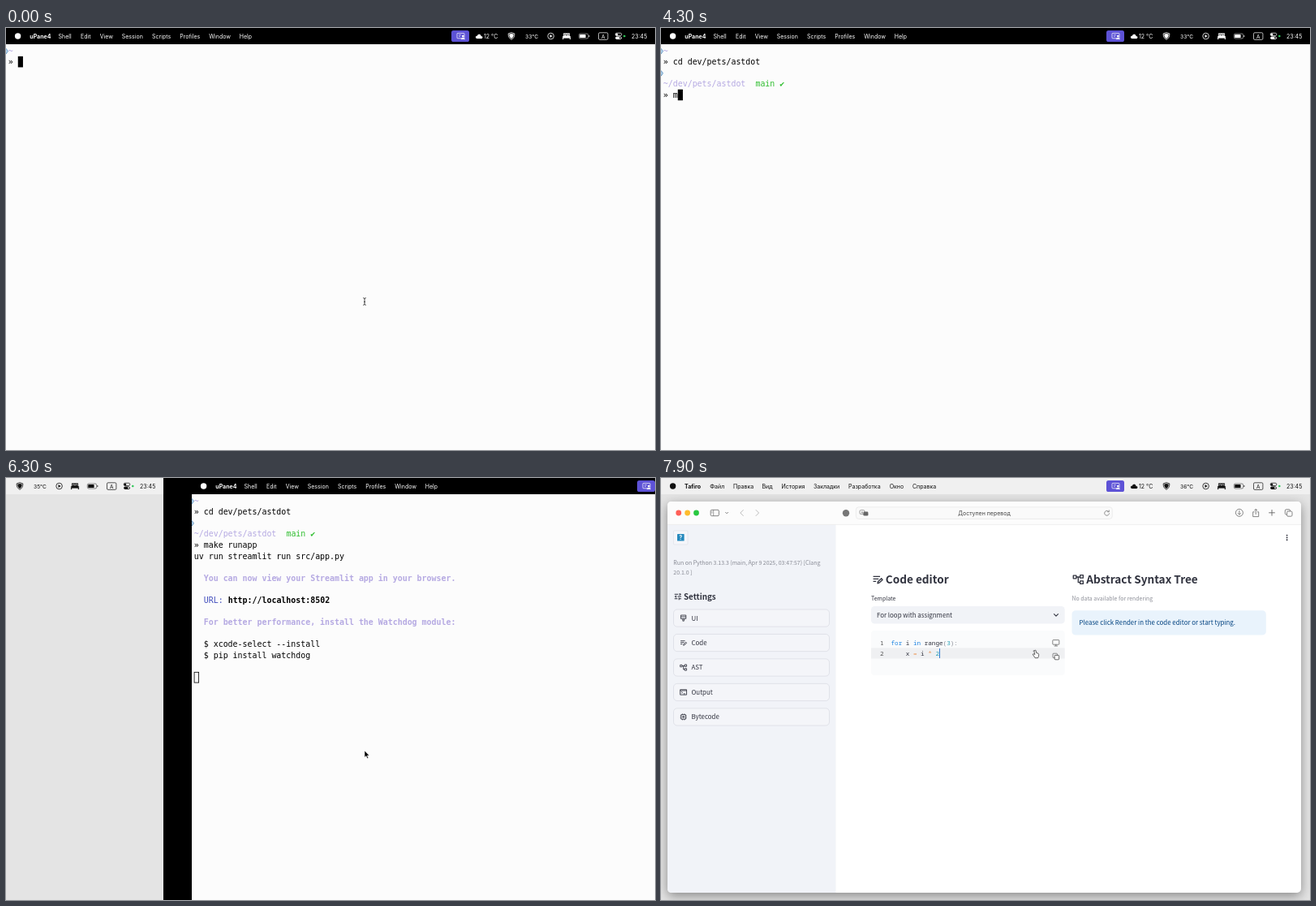
Recreate the animation shown at these times as an HTML page. Size 800 by 520 pixels, loop 8 s.

```html
<!DOCTYPE html>
<html lang="en">
<head>
<meta charset="utf-8">
<title>Terminal to browser</title>
<style>
html, body { margin: 0; width: 100%; height: 100%; overflow: hidden; background: #000; }
svg { display: block; width: 800px; height: 520px; }
text { white-space: pre; font-family: Inter, sans-serif; }
.mono { font-family: "DejaVu Sans Mono", monospace; }
.code { font-family: "Noto Sans Mono", monospace; }
.page { font-family: "Noto Sans CJK JP", "Noto Sans CJK SC", "Noto Sans CJK", "Open Sans", sans-serif; }
.b { font-weight: 700; }
.sb { font-weight: 600; }
.mid { text-anchor: middle; }
.win { filter: drop-shadow(0 4px 7px #0006); }
</style>
</head>
<body>
<svg id="stage" viewBox="0 0 800 520"></svg>
<script>
const stage = document.getElementById('stage');
const LOOP = 8000, STEP = 100, SPACE = 835;
const CELL = 5.98, ROW = 13.6, LEFT = 2.8;
const INK = '#31333f', LILAC = '#b5a9e2';

// drawing helpers
const text = (x, y, s, size, fill, cls = '') =>
  `<text x="${x}" y="${y}" font-size="${size}" fill="${fill}" class="${cls}">${s}</text>`;
const rect = (x, y, w, h, fill, r = 0, line = 'none', lw = .6) =>
  `<rect x="${x}" y="${y}" width="${w}" height="${h}" rx="${r}" fill="${fill}" stroke="${line}" stroke-width="${lw}"/>`;
const dot = (x, y, r, fill, line = 'none', lw = .8) =>
  `<circle cx="${x}" cy="${y}" r="${r}" fill="${fill}" stroke="${line}" stroke-width="${lw}"/>`;
const path = (d, line, lw = .8, fill = 'none') =>
  `<path d="${d}" stroke="${line}" stroke-width="${lw}" fill="${fill}" stroke-linejoin="round"/>`;
const move = (x, y, s, k = 1) => `<g transform="translate(${x} ${y}) scale(${k})">${s}</g>`;

const ICONS = {
  tune: 'M3 6h10M17 6h4M17 3v6M3 12h4M7 9v6M11 12h10M3 18h8M15 15v6M15 18h6',
  note: 'M3 6h14M3 11h11M3 16h6M12 20l1-4 7-6 2 3-7 6z',
  tree: 'M2 4h6v6H2zM16 3h6v6h-6zM16 15h6v6h-6zM8 7h8M12 7v11h4',
  term: 'M2 4h20v16H2zM2 7h20M6 10l3 3-3 3M12 17h6',
  chip: 'M5 5h14v14H5zM10 10h4v4h-4zM9 2v3M15 2v3M9 19v3M15 19v3M2 9h3M2 15h3M19 9h3M19 15h3',
  paint: 'M4 3h16v11H4zM4 8h16M10 14v7h4v-7'
};
const icon = (name, x, y, size) =>
  move(x - size / 2, y - size / 2, path(ICONS[name], INK, 2.2), size / 24);

// menu bar
const SHELL_MENU = [['uPane4', 29.3], ['Shell', 64.5], ['Edit', 92], ['View', 115.7], ['Session', 142.8],
  ['Scripts', 180], ['Profiles', 214.3], ['Window', 250.2], ['Help', 287.8]];
const WEB_MENU = [['Tafiro', 29], ['Файл', 60.3], ['Правка', 89], ['Вид', 124.5], ['История', 148.5],
  ['Закладки', 188], ['Разработка', 231], ['Окно', 281.7], ['Справка', 310]];

function menuBar(items, bg, fg, temp, weather) {
  return rect(0, 0, 800, 20, bg) + dot(14.6, 10, 3.7, fg) +
    items.map(([s, x], i) => text(x, 12.5, s, 7, fg, i ? '' : 'b')).join('') +
    rect(549, 3, 22, 14, '#5d52d6', 2.6) +
    rect(556, 6.4, 9, 6.4, 'none', .8, '#fff', .7) +
    path('M558 8.6h3M558 10.4h2', '#fff', .6) +
    dot(563.3, 10, 1.3, '#fff') + path('M560.8 13.8q2.5-4 5 0z', '#fff', .3, '#fff') +
    path('M580.6 13q-2-.3-1.6-2 .4-1.4 1.9-1.2 .6-2.3 2.7-2 1.8.4 1.9 2.2 2.2.1 1.9 1.8-.4 1.2-1.4 1.2z', weather, .2, weather) +
    text(589, 12.5, '12 °C', 7, weather) +
    path('M623 5.7l3.8 1.2q.4 5-3.8 7.4-4.2-2.4-3.8-7.4z', fg, .8) +
    path('M623 7l2.6.8q.2 3.4-2.6 5.1-2.8-1.7-2.6-5.1z', fg, .2, fg) +
    text(640, 12.5, temp, 6.7, fg) +
    dot(671.6, 10, 3.8, 'none', fg) + path('M670.6 8.2v3.6l2.9-1.8z', fg, .2, fg) +
    path('M686.2 14v-3.6l1-1V6.6h7.6v2.8l1 1V14h-.9v-1.4h-7.8V14z', fg, .2, fg) +
    path('M688.2 9.3V8h2.3v1.3M691.5 9.3V8h2.3v1.3', bg, .6) +
    rect(706.3, 7, 11.4, 6, 'none', 1.7, fg, .5) + rect(707.2, 7.9, 7.4, 4.2, fg, .9) +
    path('M718.8 9v2', fg, .8) +
    rect(730.5, 5.8, 11.4, 8.6, 'none', 1.4, fg, .7) + text(736.2, 12.5, 'A', 6.4, fg, 'mid') +
    rect(751.2, 6.2, 7.6, 3.3, 'none', 1.6, fg, .7) + dot(752.8, 7.9, 1.5, fg) +
    rect(751.2, 10.5, 7.6, 3.4, fg, 1.7) + dot(757, 12.2, 1, bg) +
    dot(762.3, 10, 1.3, '#30c95a') + text(771, 12.5, '23:45', 7, fg);
}

// terminal
const TYPED = [
  ['cd dev/pets/astdot', [[700, 1], [800, 2], [1000, 3], [1200, 5], [1400, 6], [1900, 7], [2200, 8],
    [2300, 9], [2500, 12], [2800, 13], [3100, 14], [3200, 15], [3300, 16], [3500, 18]]],
  ['make runapp', [[4300, 1], [4400, 3], [4500, 4], [4700, 5], [5100, 7], [5200, 8],
    [5600, 9], [5700, 10], [5800, 11]]]
];
const typedAt = (i, t) => TYPED[i][0].slice(0, TYPED[i][1].reduce((n, [at, k]) => t >= at ? k : n, 0));
const cell = (row, col, s, fill = '#000', cls = '') =>
  text(LEFT + col * CELL, 31.6 + row * ROW, s, 9.93, fill, 'mono ' + cls);
const caret = (row, col, hollow) => hollow
  ? rect(LEFT + .3, 21.7 + row * ROW, 5.5, 12.8, 'none', 0, '#000', .8)
  : rect(LEFT + col * CELL, 21.3 + row * ROW, CELL + .2, 13.5, '#000');
const mark = row => path(`M0 ${25.2 + row * ROW}l2.4 3.4-2.4 3.4`, '#4b86b8', .8, '#b7d6ee');

function terminal(t) {
  const first = typedAt(0, t), second = typedAt(1, t);
  let s = rect(0, 0, 800, 520, '#fcfcfc') +
    menuBar(SHELL_MENU, '#000', '#fff', '33°C', '#fff') +
    mark(0) + cell(0, 0, '~', LILAC) + cell(1, 0, '» ' + first);
  if (t < 3800) return s + caret(1, 2 + first.length);
  s += mark(2) + cell(3, 0, '~/dev/pets/astdot', LILAC) + cell(3, 19, 'main ✔', '#2dbd2d') +
    cell(4, 0, '» ' + second);
  if (t < 6000) return s + caret(4, 2 + second.length);
  s += cell(5, 0, 'uv run streamlit run src/app.py');
  if (t < 6100) return s + caret(6, 0);
  return s + cell(7, 2, 'You can now view your Streamlit app in your browser.', LILAC, 'b') +
    cell(9, 2, 'URL:', '#4450bd') + cell(9, 7, 'http://localhost:8502', '#000', 'b') +
    cell(11, 2, 'For better performance, install the Watchdog module:', LILAC, 'b') +
    cell(13, 2, '$ xcode-select --install') + cell(14, 2, '$ pip install watchdog') +
    caret(16, 0, t >= 6200);
}

// web page
const BUTTONS = [['UI', 'paint'], ['Code', 'note'], ['AST', 'tree'], ['Output', 'term'], ['Bytecode', 'chip']];

function sidebar(t) {
  let s = '<path d="M8 57.5h207.5V511H13q-5 0-5-5z" fill="#f1f3f8"/>';
  if (t < 6900) return s;
  s += rect(15.5, 65, 17.5, 17, '#f5f6fa', 1, '#dcdfe6');
  if (t >= 7500) s += rect(20, 69, 8.6, 8.6, '#2589bd', .6) + text(24.3, 76, '?', 7, '#fff', 'mid b');
  s += text(15.3, 106.5, 'Run on Python 3.13.3 (main, Apr 9 2025, 03:47:57) [Clang', 6.95, '#888a94', 'page') +
    text(15.3, 118.5, '20.1.0 ]', 6.95, '#888a94', 'page') +
    icon('tune', 20.8, 146, 11) + text(28, 149.8, 'Settings', 9.8, INK, 'page b');
  if (t < 7000) return s;
  return s + BUTTONS.map(([name, pic], i) => {
    const y = 162 + i * 30.45;
    return rect(15.5, y, 192, 21.2, '#f4f5f9', 4.4, '#d3d6de') +
      icon(pic, 27.6, y + 10.6, 9.5) + text(37.5, y + 13.5, name, 7.9, INK, 'page');
  }).join('');
}

const span = (s, fill) => `<tspan fill="${fill}">${s}</tspan>`;

function editor(t) {
  const BLUE = '#1c83e1', TEAL = '#2aa3b8', SIGN = '#ed9a5c', GREY = '#8a8d97';
  let s = rect(259, 188, 238.7, 55, '#fafbfc', 4) + rect(259, 209.5, 238.7, 13, '#eff0f2') +
    text(270, 205.8, '1', 7.64, '#555', 'code') + text(270, 218.8, '2', 7.64, '#555', 'code') +
    text(283.5, 205.8, span('for', BLUE) + ' i ' + span('in', BLUE) + ' range' + span('(', GREY) +
      span('3', TEAL) + span('):', GREY), 7.64, INK, 'code') +
    text(283.5, 218.8, '    x ' + span('=', SIGN) + ' i ' + span('*', SIGN) + ' ' + span('2', TEAL), 7.64, INK, 'code') +
    rect(343, 210, .9, 12, '#1c6fd0');
  if (t >= 7700) s += rect(482.8, 199.6, 8, 5.6, 'none', .6, '#666', .8) + path('M486.8 205v2M484.6 207h4.4', '#666') +
    rect(483, 216.2, 5.4, 5.4, 'none', .8, '#444') + rect(485.2, 218.4, 5.4, 5.4, '#fff', .8, '#444', .8);
  return s;
}

function content(t) {
  let s = [70.6, 73.4, 76.2].map(y => dot(771.6, y, .95, INK)).join('');
  if (t >= 7000) s += icon('note', 267, 125, 14.5) + text(276.8, 130.2, 'Code editor', 13.6, INK, 'page b') +
    icon('tree', 514.3, 125, 14.5) + text(524.3, 130.2, 'Abstract Syntax Tree', 13.6, INK, 'page b');
  if (t >= 7100) s += text(259, 151, 'Template', 6.95, INK, 'page') +
    rect(259, 158, 238.7, 21.6, '#f1f3f7', 4.4) +
    text(266, 171.6, 'For loop with assignment', 7.9, INK, 'page') +
    path('M484.2 167.4l2.8 2.8 2.8-2.8', INK, 1.1) +
    text(506.5, 150.6, 'No data available for rendering', 6.95, '#8d8f98', 'page') +
    rect(506.5, 163.3, 239.3, 30.3, '#e9f3fc', 4.4) +
    text(515.5, 181.2, 'Please click Render in the code editor or start typing.', 7.9, '#004280', 'page');
  return t < 7200 ? s : s + editor(t);
}

function addressBar(t) {
  const grey = '#777';
  if (t < 6900) return rect(240, 35.6, 317, 15, '#f0f0f0', 3.4) +
    text(398.5, 45.6, 'localhost', 7, '#444', 'mid') +
    rect(245, 40, 6.6, 3.2, 'none', .6, grey) + path('M245 44.8h5.6M245 46.8h3.6', grey) +
    path('M547 40.5l5 5M552 40.5l-5 5', grey) +
    rect(243, 48.9, 25 + (t - 6400) * .5, 1.3, '#3b78c8', .6);
  return rect(240.3, 35.8, 316, 14.6, '#fafafa', 3.4, '#e2e2e2') +
    text(398.5, 45.6, t < 7500 ? 'localhost' : 'Доступен перевод', 7, '#444', 'mid') +
    rect(245, 39.6, 6, 5, '#fafafa', 1.4, '#666') + rect(249.4, 41.6, 6, 5, '#666', 1.4) +
    text(248, 43.8, 'A', 4, '#555', 'mid') +
    path('M551.6 41.2a2.9 2.9 0 1 0 .9 2.2M552.3 39.5v2.2h-2.2', '#666', .7);
}

function browser(t) {
  const grey = '#666', pale = '#bbb', share = t < 6800 ? pale : grey;
  return `<g class="win">${rect(8, 29, 781, 482, '#fff', 5)}</g>` +
    path('M8 57.5V34q0-5 5-5H784q5 0 5 5V57.5z', 'none', 0, '#fcfcfc') +
    (t >= 6700 ? sidebar(t) : '') + path('M8 57.4H789', '#e6e6e6', .6) +
    ['#ff5f57', '#febc2e', '#28c840'].map((c, i) => dot(21.7 + i * 10.9, 43, 3.4, c)).join('') +
    rect(61.2, 39.3, 10.2, 7.4, 'none', 1.4, grey, .8) + path('M64.7 39.3v7.4M62.3 41.2h1.3M62.3 42.8h1.3', grey, .6) +
    path('M79.3 42l1.8 1.8 1.8-1.8', grey) +
    path('M101.6 39.2l-3.8 3.8 3.8 3.8M116.8 39.2l3.8 3.8-3.8 3.8', '#b5b5b5', .9) +
    dot(228, 43.2, 4.2, '#777') + addressBar(t) +
    dot(712.9, 42.8, 4.5, 'none', grey) + path('M712.9 40v5M711 43.3l1.9 1.9 1.9-1.9', grey) +
    path('M731.5 41.8h-1.8v5.8h7v-5.8h-1.8M733.2 45v-6.6M731.3 40.2l1.9-1.9 1.9 1.9', share) +
    path('M753 39v7.6M749.2 42.8h7.6', grey, .9) +
    rect(769.3, 38.8, 6.2, 6.2, 'none', 1.4, grey, .8) + rect(771.6, 41, 6.4, 6.2, '#fcfcfc', 1.4, grey, .8) +
    (t >= 6800 ? content(t) : '');
}

function desktop(t) {
  return rect(0, 0, 800, 520, '#e4e4e4') + (t >= 6400 ? browser(t) : '') +
    menuBar(WEB_MENU, '#f0f0f0', '#111', t < 7300 ? '35°C' : '36°C', t < 6900 ? '#fff' : '#111');
}

// mouse pointer
function pointer(t) {
  if (t < 700) return path('M440.2 332.6q1.8 0 1.8 1.2 0-1.2 1.8-1.2M442 333.6v6.8M440.2 341.4q1.8 0 1.8-1.2 0 1.2 1.8 1.2M441 337.4h2', '#222', .8);
  if (t < 6200) return '';
  const p = Math.min(1, Math.max(0, (t - 7400) / 500)), e = p * p * (3 - 2 * p);
  const x = 442 + 17.5 * e, y = 336 - 124 * e;
  return move(x, y, y > 243
    ? path('M0 0v8.2l1.9-1.7 1.4 3 1.3-.6-1.4-2.9h2.6z', '#fff', .5, '#000')
    : path('M1.2.6q.9-1.2 1.5.3l.5 2.6q3 .2 3 2 .1 2.2-1.1 4.2H1.6Q-.2 6.8-1.3 5.3q.6-1.2 2.7.2L.4 1.7z', '#222', .7, '#fff') +
      path('M-.9 1.2q1-1 2.5-.2', '#222', .6));
}

function render(t) {
  const shift = t < 6300 ? 0 : t < 6400 ? 229 : SPACE;
  stage.innerHTML = rect(0, 0, 800, 520, '#000') +
    (shift ? move(shift - SPACE, 0, desktop(t)) : '') +
    (shift < SPACE ? move(shift, 0, terminal(t)) : '') + pointer(t);
}

let start, shown = -1;
function tick(now) {
  start ??= now;
  const t = Math.floor((now - start) % LOOP / STEP) * STEP;
  if (t !== shown) render(shown = t);
  requestAnimationFrame(tick);
}
render(0);
requestAnimationFrame(tick);
</script>
</body>
</html>
```
